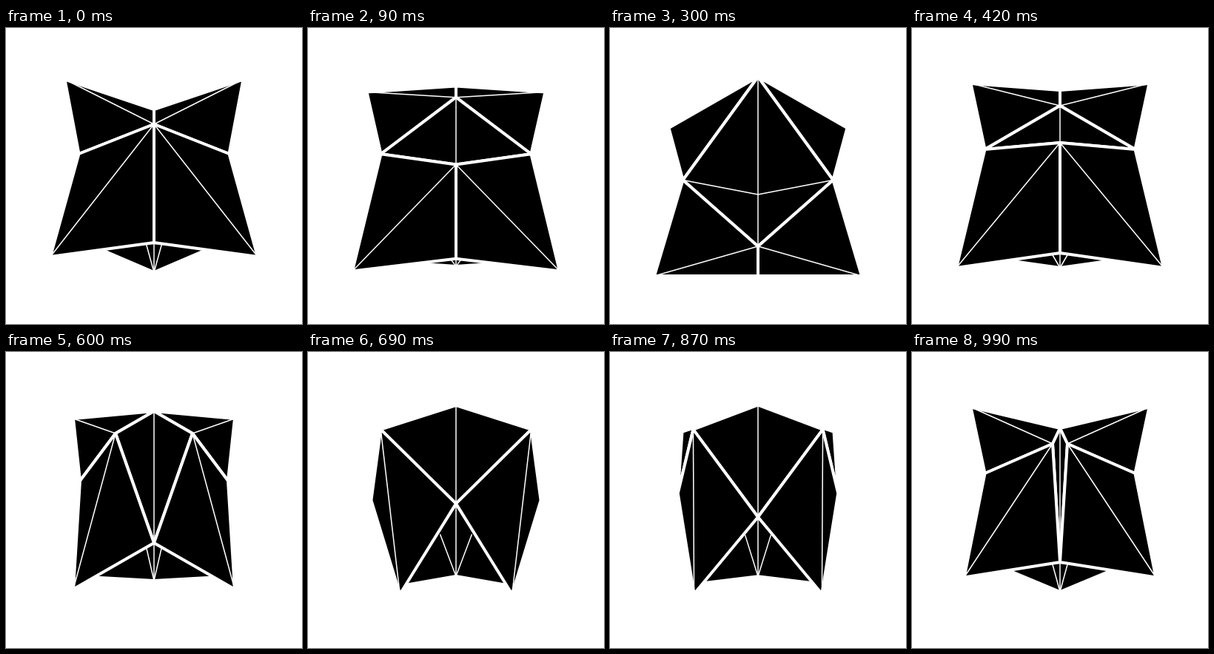
Write an HTML page that moves like this. It is 400 by 400 pixels and loops after 1.02 s.

```html
<!DOCTYPE html>
<html lang="en">
<head>
<meta charset="utf-8">
<title>Folding solid</title>
<style>
  html, body { margin: 0; width: 100%; height: 100%; overflow: hidden; background: #fff; }
  svg { display: block; width: 100vw; height: 100vh; }
  path { stroke: #fff; stroke-linejoin: round; }
  .body { fill: #000; stroke-width: 4; }
  .crease { fill: none; stroke-width: 1.5; }
</style>
</head>
<body>
<svg id="stage" viewBox="0 0 400 400"></svg>
<script>
const LOOP = 1020, STEP = 30, MID = 200;
const svg = document.getElementById("stage");

// Each vertex: distance from the mirror axis and height, from closed to open.
// A single number stays constant.
const tilt = {
  centre: 240,
  knots: [0, 60, 180, 240],
  points: {
    ear:   [120.5, [69.5, 75, 135, 147]],
    hip:   [101.5, [170, 164, 205.5, 212]],
    tip:   [0, [130, 105, 66, 56]],
    crown: [0, [110, 84, 82, 85]],
    heart: [0, [130, 155, 295, 317]],
    foot:  [140, [309, 324, 335, 342]],
    seam:  [0, [290, 304, 335, 345]],
    ridge: [0, [185, 190, 225, 235]],
    chin:  [0, [330, 324, 318, 316]],
    jaw:   [[84, 100, 90, 90], [294, 310, 320, 320]],
    fang:  [[13, 14, 14, 14], [283, 300, 300, 300]]
  }
};

const spread = {
  centre: 765,
  knots: [0, 30, 90, 240],
  points: {
    ear:   [[120.5, 120.5, 109, 100], [69.5, 74.5, 90, 125]],
    hip:   [[101.5, 101.5, 100, 122], [170, 164, 174, 210.5]],
    tip:   [[0, 10, 52, 115], [130, 124, 110, 105.5]],
    crown: [0, [110, 103, 80, 74]],
    foot:  [[140, 129.5, 109, 65], [309, 304.5, 320.5, 326.5]],
    seam:  [0, [290, 284, 258, 186]],
    chin:  [0, [330, 324, 309, 304]],
    jaw:   [[84, 84, 90, 61], [294, 289, 304, 317]],
    fang:  [[13, 12, 12, 26], [283, 280, 257, 247]]
  }
};

// Smooth curve through the values, at rest at both ends.
function curve(knots, values, at) {
  if (typeof values === "number") return values;
  const last = knots.length - 1;
  if (at <= knots[0]) return values[0];
  if (at >= knots[last]) return values[last];
  const rise = i => (values[i + 1] - values[i]) / (knots[i + 1] - knots[i]);
  const slope = i => {
    if (i === 0 || i === last) return 0;
    const a = knots[i] - knots[i - 1], b = knots[i + 1] - knots[i];
    return (rise(i - 1) * b + rise(i) * a) / (a + b);
  };
  let i = 0;
  while (at > knots[i + 1]) i++;
  const h = knots[i + 1] - knots[i], u = (at - knots[i]) / h, v = 1 - u;
  return values[i] * v * v * (1 + 2 * u) + values[i + 1] * u * u * (1 + 2 * v)
    + h * u * v * (slope(i) * v - slope(i + 1) * u);
}

function poseAt(t) {
  const move = t < 495 ? tilt : spread;
  const half = move === tilt ? 240 : 255;
  const at = half - Math.abs(t - move.centre);
  const pose = {};
  for (const [name, [x, y]] of Object.entries(move.points)) {
    pose[name] = [curve(move.knots, x, at), curve(move.knots, y, at)];
  }
  if (!pose.heart) pose.heart = pose.tip;
  return pose;
}

const left = p => [MID - p[0], p[1]];
const right = p => [MID + p[0], p[1]];
const cross = (a, b, c) =>
  (b[0] - a[0]) * (c[1] - a[1]) - (b[1] - a[1]) * (c[0] - a[0]);
const line = points => "M" + points.map(p => p.map(n => n.toFixed(2)).join(" ")).join("L");
const body = points => `<path class="body" d="${line(points)}Z"/>`;
const crease = (...points) => `<path class="crease" d="${line(points)}"/>`;

// A kite lying across the mirror axis.
function kite(top, side, bottom) {
  return body([left(top), left(side), left(bottom), right(side)])
    + crease(left(top), left(bottom));
}

function upper(p, side) {
  const [ear, hip, tip, crown] = [p.ear, p.hip, p.tip, p.crown].map(side);
  const sign = side === left ? 1 : -1;
  const wing = cross(ear, tip, hip) * sign > 0;
  const flap = cross(ear, tip, crown) * sign < 0;
  if (wing && flap) return body([ear, crown, tip, hip]) + crease(ear, tip);
  if (wing) return body([ear, tip, hip]);
  return flap ? body([ear, crown, tip]) : "";
}

function lower(p, side) {
  const [hip, heart, seam, foot] = [p.hip, p.heart, p.seam, p.foot].map(side);
  return body([hip, heart, seam, foot]) + crease(heart, foot);
}

function middle(p) {
  if (p.tip[0] > 0.5) return kite(p.crown, p.tip, p.seam);
  if (p.heart[1] - p.tip[1] < 1) return "";
  let out = kite(p.tip, p.hip, p.heart);
  if (p.ridge && p.ridge[1] < p.heart[1]) {
    out += crease(left(p.hip), left(p.ridge), right(p.hip));
  }
  return out;
}

function draw(t) {
  const p = poseAt(t);
  svg.innerHTML = kite(p.seam, p.jaw, p.chin)
    + crease(left(p.fang), left(p.chin), right(p.fang))
    + upper(p, left) + upper(p, right)
    + middle(p)
    + lower(p, left) + lower(p, right);
}

const start = performance.now();
let shown = -1;
function tick() {
  const t = Math.floor(((performance.now() - start) % LOOP) / STEP) * STEP;
  if (t !== shown) draw(shown = t);
  requestAnimationFrame(tick);
}
tick();
</script>
</body>
</html>
```
